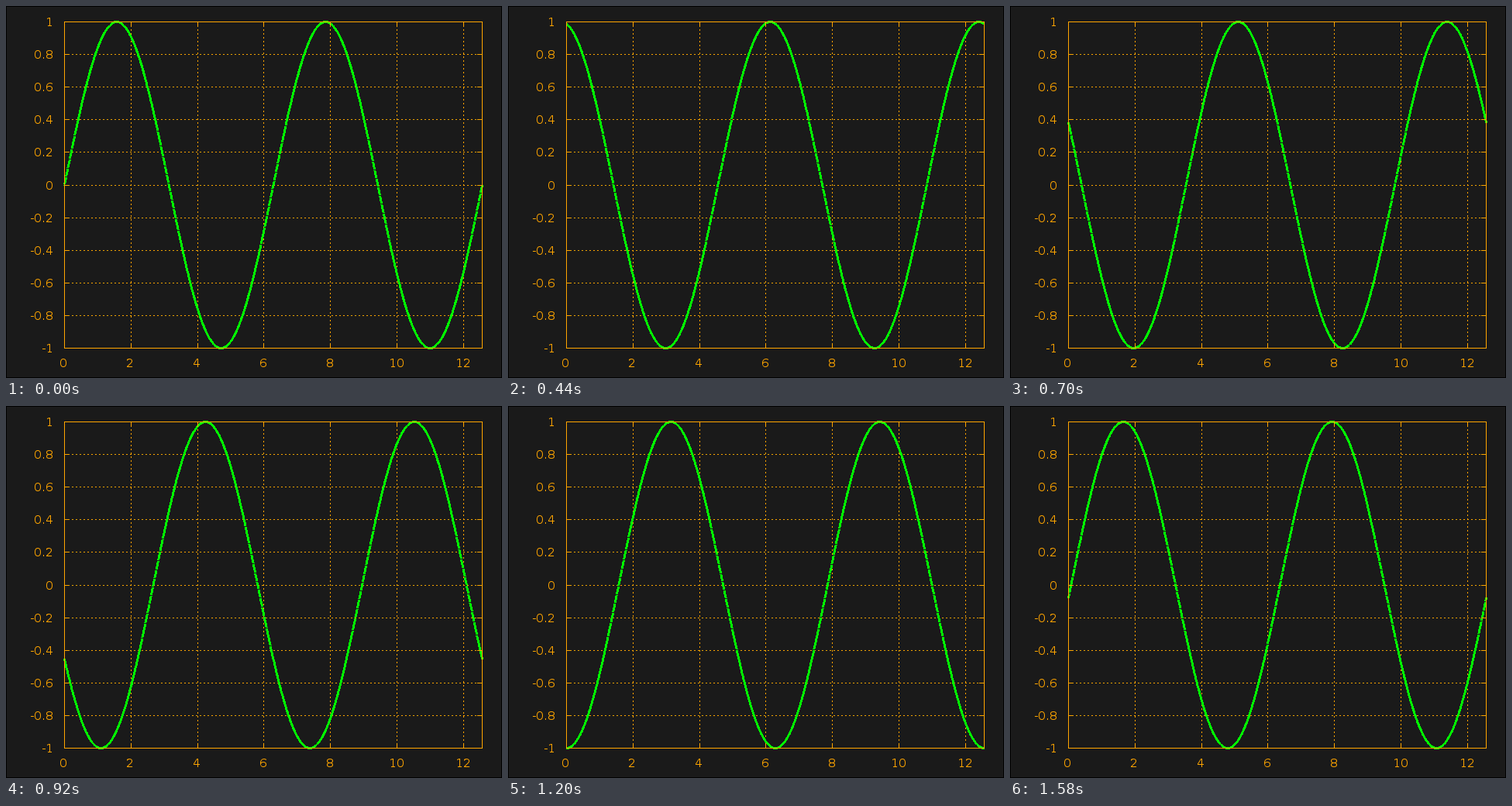
A matplotlib script that plays this animation: 640 by 480 pixels, repeating every 1600 ms.

```python
import numpy as np
import matplotlib.pyplot as plt
from matplotlib.animation import FuncAnimation
from matplotlib.collections import PolyCollection

# Whole-pixel glyph advances, as in classic plotting tools.
plt.rcParams["text.hinting"] = "default"
plt.rcParams["text.hinting_factor"] = 1

W, H, DPI = 640, 480, 100
PX = 72 / DPI                      # one pixel in points
FRAMES, INTERVAL = 80, 20
LEFT, RIGHT, TOP, BOTTOM = 75, 614, 20, 441
X_MAX = 4 * np.pi
TICK = 6
DOTS = (0, (2, 3))
BACK, ORANGE, GREEN = "#1a1a1a", "#ffa500", "#00ff00"

fig = plt.figure(figsize=(W / DPI, H / DPI), dpi=DPI, facecolor=BACK)
ax = fig.add_axes([0, 0, 1, 1])
ax.set_xlim(0, W)
ax.set_ylim(H, 0)
ax.axis("off")


def to_px(x):
    return np.rint(LEFT + x / X_MAX * (RIGHT - LEFT))


def to_py(y):
    # halves round downwards on screen
    return np.floor(BOTTOM - (y + 1) / 2 * (BOTTOM - TOP) + 0.5)


def stroke(x0, y0, x1, y1, color=ORANGE, style="-", z=4):
    """One-pixel line through pixel centres, both end pixels included."""
    dx, dy = (0.5, 0) if y0 == y1 else (0, 0.5)
    ax.plot([x0 + 0.5 - dx, x1 + 0.5 + dx], [y0 + 0.5 - dy, y1 + 0.5 + dy],
            color=color, lw=PX, ls=style, snap=False,
            solid_capstyle="butt", dash_capstyle="butt", zorder=z)


def box(x0, y0, x1, y1, color):
    for y in (y0, y1):
        stroke(x0, y, x1, y, color)
    for x in (x0, x1):
        stroke(x, y0, x, y1, color)


def label(x, y, text, align):
    ax.text(x, y, text, color=ORANGE, family="DejaVu Sans", size=15 * PX,
            ha=align, va="baseline")


box(0, 0, W - 1, H - 1, "black")
box(LEFT, TOP, RIGHT, BOTTOM, ORANGE)

for i in range(-5, 6):
    y = to_py(i / 5)
    if abs(i) < 5:
        stroke(LEFT, y, RIGHT, y, style=DOTS, z=1)
        stroke(LEFT, y, LEFT + TICK, y)
        stroke(RIGHT - TICK, y, RIGHT, y)
    label(61, y + 6, f"{i / 5:g}", "right")

for value in range(0, 13, 2):
    x = to_px(value)
    if value:
        stroke(x, TOP, x, BOTTOM, style=DOTS, z=1)
        stroke(x, TOP, x, TOP + TICK)
        stroke(x, BOTTOM - TICK, x, BOTTOM)
    label(x - 0.5, 466, str(value), "center")

xs = np.linspace(0, X_MAX, 2400)
steepest = (BOTTOM - TOP) / 2 * X_MAX / (RIGHT - LEFT)
curve = PolyCollection([], facecolors=GREEN, linewidths=0,
                       antialiased=False, zorder=3)
ax.add_collection(curve, autolim=False)


def pen_marks(phase):
    """Pixel-wide pen marks, three long, laid across the curve."""
    px, py = to_px(xs), to_py(np.sin(xs + phase))
    steep = np.abs(np.cos(xs + phase)) * steepest > 1
    marks = np.unique(np.column_stack([px, py, steep]), axis=0)
    px, py, steep = marks.T
    x0, x1 = px - steep, px + 1 + steep
    y0, y1 = py - (1 - steep), py + 2 - steep
    return np.stack([np.column_stack([x0, y0]), np.column_stack([x1, y0]),
                     np.column_stack([x1, y1]), np.column_stack([x0, y1])],
                    axis=1)


def update(frame):
    curve.set_verts(pen_marks(2 * np.pi * frame / FRAMES))
    return curve,


anim = FuncAnimation(fig, update, frames=FRAMES, interval=INTERVAL,
                     repeat=True, repeat_delay=0)
plt.show()
```
